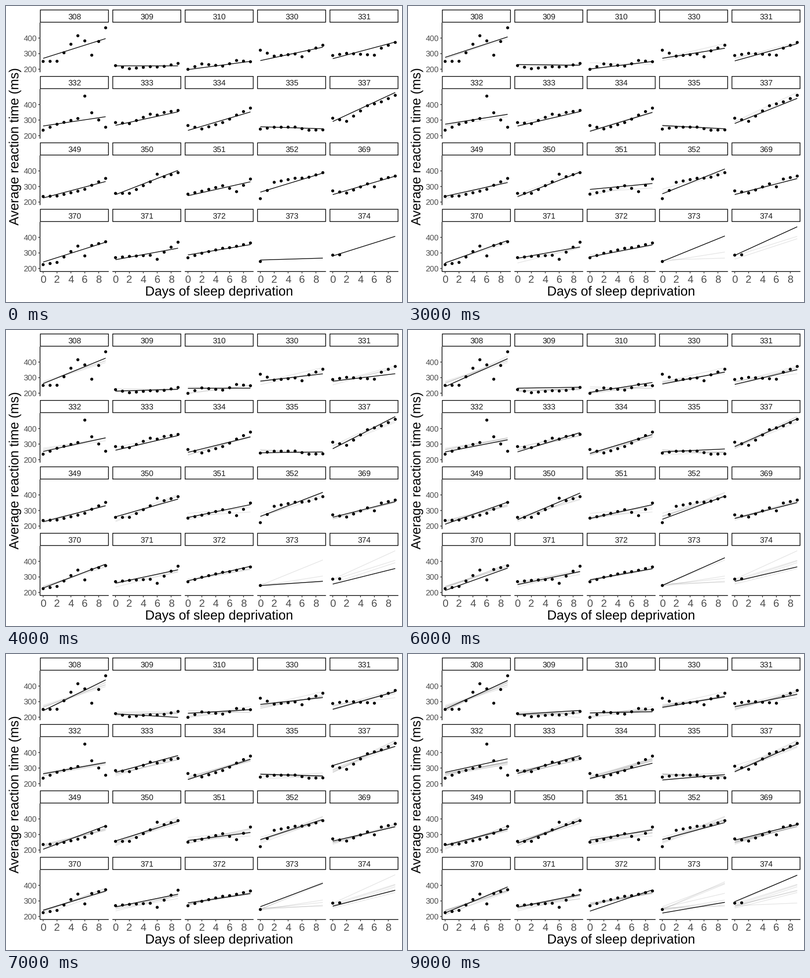
A matplotlib script that plays this animation: 800 px wide and 600 px high, repeating every 10 s.

```python
import matplotlib.pyplot as plt
import numpy as np
from matplotlib.animation import FuncAnimation
from matplotlib.collections import LineCollection
from matplotlib.patches import Circle, Rectangle

plt.rcParams.update({"font.family": "Liberation Sans",
                     "text.hinting": "none", "path.snap": False})

W, H, DPI = 800, 600, 100
PT = 72 / DPI                          # points per pixel
LEFT, TOP, GAP = 68.7, 7.33, 7.33
PANEL_W, PANEL_H, STRIP_H = 138.93, 100.7, 26.2
PITCH_X, PITCH_Y = PANEL_W + GAP, 134.67
DAY_W, MS_H = PANEL_W / 9.9, 0.3155    # pixels per day and per ms
Y200 = 128.1                           # height of 200 ms in the top row
LINE = 1.42
DRAWS, COLS = 9, 5

# Reaction times at a few key days; the days between are interpolated
KEY_DAYS = (0, 2, 5, 6, 7, 9)
KEYS = {
    "308": (250, 251, 415, 382, 290, 466),
    "309": (223, 203, 216, 214, 218, 237),
    "310": (199, 234, 220, 235, 256, 248),
    "330": (322, 284, 298, 280, 318, 354),
    "331": (288, 302, 293, 290, 335, 372),
    "332": (235, 273, 310, 454, 347, 254),
    "333": (284, 277, 338, 332, 349, 362),
    "334": (265, 243, 284, 306, 332, 377),
    "335": (242, 254, 255, 245, 235, 237),
    "337": (312, 292, 392, 404, 417, 459),
    "349": (236, 239, 270, 282, 308, 352),
    "350": (256, 256, 330, 379, 363, 389),
    "351": (251, 270, 305, 288, 267, 348),
    "352": (222, 327, 353, 354, 360, 389),
    "369": (272, 258, 317, 298, 348, 367),
    "370": (225, 239, 344, 281, 348, 372),
    "371": (270, 278, 285, 259, 305, 369),
    "372": (269, 298, 330, 334, 343, 364),
    "373": (245,),
    "374": (286, 288),
}

# Mixed model: intercept and slope over all subjects, their spread, the noise
MEAN = np.array([251.4, 10.5])
PRIOR = np.diag(1 / np.array([24.7, 5.9]) ** 2)
NOISE = 22

rng = np.random.default_rng(8)

fig = plt.figure(figsize=(W / DPI, H / DPI), dpi=DPI, facecolor="white")
ax = fig.add_axes([0, 0, 1, 1])
ax.set_xlim(0, W)
ax.set_ylim(H, 0)
ax.axis("off")


def px(col, day):
    return LEFT + col * PITCH_X + (day + 0.45) * DAY_W


def py(row, ms):
    return Y200 + row * PITCH_Y - (ms - 200) * MS_H


def rule(xs, ys, color="black"):
    ax.plot(xs, ys, color=color, lw=LINE * PT, solid_capstyle="butt")


def label(x, y, s, size, color="black", **kw):
    ax.text(x, y, s, fontsize=size * PT, color=color,
            **{"ha": "center", "va": "baseline", **kw})


def observed(keys):
    if len(keys) < len(KEY_DAYS):
        return np.array(keys, float)
    return np.interp(np.arange(10), KEY_DAYS, keys)


def draw_fits(times):
    """Random (intercept, slope) pairs given one subject's times."""
    z = np.column_stack([np.ones(len(times)), np.arange(len(times))])
    cov = np.linalg.inv(z.T @ z / NOISE ** 2 + PRIOR)
    centre = cov @ (z.T @ times / NOISE ** 2 + PRIOR @ MEAN)
    return rng.multivariate_normal(centre, cov, DRAWS)


def strip(x, y, name):
    ax.add_patch(Rectangle((x + LINE / 2, y + LINE / 2), PANEL_W - LINE,
                           STRIP_H - LINE, fc="white", ec="black",
                           lw=LINE * PT, joinstyle="miter"))
    label(x + PANEL_W / 2 + 0.5, y + 19.3, name, 16, "#1a1a1a")


segments = [[] for _ in range(DRAWS)]
for n, (name, keys) in enumerate(KEYS.items()):
    row, col = divmod(n, COLS)
    strip(LEFT + col * PITCH_X, TOP + row * PITCH_Y, name)
    times = observed(keys)
    for day, ms in enumerate(times):
        ax.add_patch(Circle((px(col, day), py(row, ms)), 3.05,
                            fc="black", lw=0, zorder=5))
    for seg, (a, b) in zip(segments, draw_fits(times)):
        seg.append([(px(col, d), py(row, a + b * d)) for d in (0, 9)])

# Value axes of the four rows
for row in range(4):
    top = TOP + STRIP_H + row * PITCH_Y
    rule([LEFT, LEFT], [top, top + PANEL_H])
    for ms in (200, 300, 400):
        y = py(row, ms)
        rule([LEFT - 3.67, LEFT], [y, y], "#333333")
        label(62.2, y + 5.7, str(ms), 16, "#4d4d4d", ha="right")

# Day axes below the bottom row
base = TOP + STRIP_H + 3 * PITCH_Y + PANEL_H
for col in range(COLS):
    x = LEFT + col * PITCH_X
    rule([x, x + PANEL_W], [base, base])
    for day in range(0, 10, 2):
        x = px(col, day)
        rule([x, x], [base, base + 3.67], "#333333")
        label(x, 560.9, str(day), 21.33, "#4d4d4d")

label(430.7, 587.3, "Days of sleep deprivation", 26.67)
label(26.4, 284.7, "Average reaction time (ms)", 26.67, rotation=90,
      rotation_mode="anchor")

lines = [ax.add_collection(LineCollection(s, linewidths=LINE * PT),
                           autolim=False) for s in segments]


def update(i):
    now = max(0, i - 1)                # the first draw stays twice as long
    for k, line in enumerate(lines):
        line.set_visible(k <= now)
        line.set_color((0, 0, 0, 1 if k == now else 0.1))
        line.set_zorder(4 if k == now else 3)
    return lines


anim = FuncAnimation(fig, update, frames=10, interval=1000, repeat=True,
                     repeat_delay=0, blit=False)
plt.show()
```
